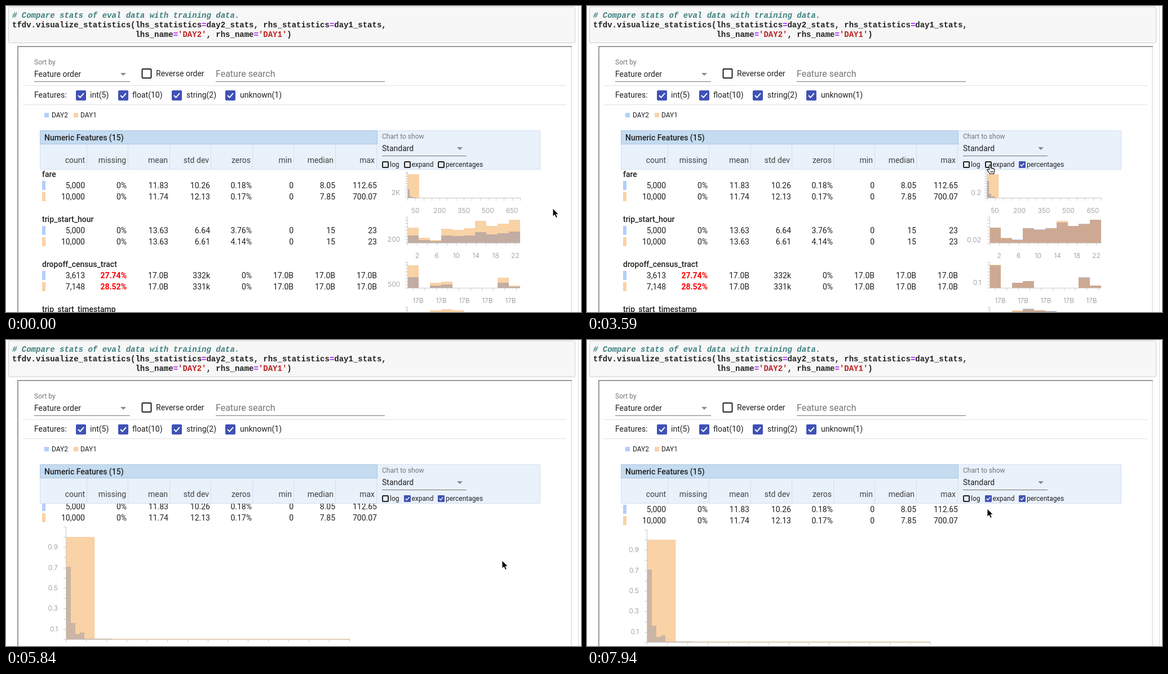
Recreate the animation shown at these times as an HTML page. Size 1020 by 544 pixels, loop 8000 ms.

```html
<!DOCTYPE html>
<html lang="en">
<head>
<meta charset="utf-8">
<title>Feature statistics</title>
<style>
html, body { margin: 0; width: 100%; height: 100%; overflow: hidden; background: #fff; }
svg { display: block; width: 1020px; height: 544px; font: 14px Roboto, sans-serif; }
text { white-space: pre; fill: #212121; }
.code { font: bold 14px "Liberation Mono", monospace; }
.axis { font: 300 12px Inter, sans-serif; fill: #8c8c8c; }
.small { font-size: 12px; }
.crisp { shape-rendering: crispEdges; }

.timed { animation: 8s step-end infinite; }
#counts { animation-name: counts; }
#shares { animation-name: shares; }
#rows { animation-name: rows; }
#big, #expandOn { animation-name: expanded; }
#percentOn { animation-name: percent; }
#ripple1 { animation-name: ripple1; }
#ripple2 { animation-name: ripple2; }
#scroll { animation-name: scroll; }
#cursor { animation-name: move; }
#hand { animation-name: hand; }
#arrow { animation-name: arrow; }

@keyframes counts { 0% { opacity: 1 } 26.125%, 100% { opacity: 0 } }
@keyframes shares { 0% { opacity: 0 } 26.125% { opacity: 1 } 58%, 100% { opacity: 0 } }
@keyframes rows { 0% { opacity: 1 } 58%, 100% { opacity: 0 } }
@keyframes expanded { 0% { opacity: 0 } 58%, 100% { opacity: 1 } }
@keyframes percent { 0% { opacity: 0 } 26.125%, 100% { opacity: 1 } }
@keyframes ripple1 { 0% { opacity: 0 } 22.375% { opacity: .2 } 26.125%, 100% { opacity: 0 } }
@keyframes ripple2 { 0% { opacity: 0 } 54.25% { opacity: .2 } 58%, 100% { opacity: 0 } }
@keyframes hand { 0% { opacity: 0 } 14.875% { opacity: 1 } 59.875%, 100% { opacity: 0 } }
@keyframes arrow { 0% { opacity: 1 } 14.875% { opacity: 0 } 59.875%, 100% { opacity: 1 } }
@keyframes scroll {
  0% { transform: none }
  71.125% { transform: translateY(-8px) }
  73% { transform: translateY(-23px) }
  74.875% { transform: translateY(-33px) }
  76.75% { transform: translateY(-41px) }
  78.625% { transform: translateY(-44px) }
  80.5% { transform: translateY(-41px) }
  82.375% { transform: translateY(-35px) }
  84.25% { transform: translateY(-24px) }
  86.125%, 100% { transform: translateY(-18px) }
}
@keyframes move {
  0% { transform: translate(970px, 360px) }
  5.625% { transform: translate(945px, 350px) }
  7.5% { transform: translate(893px, 331px) }
  9.375% { transform: translate(838px, 311px) }
  11.25% { transform: translate(800px, 298px) }
  13.125% { transform: translate(778px, 288px) }
  14.875% { transform: translate(766px, 283px) }
  37.375% { transform: translate(757px, 284px) }
  39.25% { transform: translate(742px, 285px) }
  41.125% { transform: translate(727px, 285px) }
  43% { transform: translate(715px, 284px) }
  44.875% { transform: translate(709px, 282px) }
  59.875% { transform: translate(716px, 290px) }
  61.75% { transform: translate(745px, 315px) }
  63.625% { transform: translate(800px, 355px) }
  65.5% { transform: translate(850px, 382px) }
  67.375% { transform: translate(880px, 392px) }
  97.375% { transform: translate(790px, 345px) }
  99.25%, 100% { transform: translate(710px, 300px) }
}
</style>
</head>
<body>
<svg id="stage" viewBox="0 0 1020 544"></svg>
<script>
const BLUE = '#b3cefb', ORANGE = '#f9d2a6', INDIGO = '#3f51b5', GREY = '#757575';

const rect = (x, y, w, h, fill, more = '') =>
  `<rect x="${x}" y="${y}" width="${w}" height="${h}" fill="${fill}" ${more}/>`;
const text = (x, y, s, more = '') => `<text x="${x}" y="${y}" ${more}>${s}</text>`;
const group = (body, more = '') => `<g ${more}>${body}</g>`;
const timed = (id, body) => group(body, `id="${id}" class="timed"`);
const hline = (x, y, w, c) => rect(x, y, w, 1, c);
const vline = (x, y, h, c) => rect(x, y, 1, h, c);
const label = (x, y, s, anchor = 'middle') =>
  text(x, y, s, `class="axis" text-anchor="${anchor}"`);
const range = (n, f) => Array.from({ length: n }, (_, i) => f(i)).join('');
const triangle = (x, y) => `<path d="M${x} ${y}h10l-5 5z" fill="#8a8a8a"/>`;

// Checkboxes are placed by their centre
const emptyBox = (cx, cy, size) => {
  const s = size - 2;
  return rect(cx - s / 2, cy - s / 2, s, s, 'none',
    'rx="1.2" stroke="#212121" stroke-width="2"');
};
const checkedBox = (cx, cy, size) =>
  rect(cx - size / 2, cy - size / 2, size, size, INDIGO, 'rx="2"') +
  group('<path d="M-5 0l3.5 3.6L5-3.8" fill="none" stroke="#fff" stroke-width="2"/>',
    `transform="translate(${cx} ${cy}) scale(${size / 18})"`);

function codeCell() {
  const op = '<tspan fill="#aa22ff">=</tspan>';
  const str = s => `<tspan fill="#ba2121">'${s}'</tspan>`;
  const line = (y, s, more = '') => text(11, y, s, `class="code" ${more}`);
  return rect(4.5, 1.5, 1005, 64, '#f7f7f7', 'stroke="#cfcfcf" rx="2"') +
    line(21, '# Compare stats of eval data with training data.',
      'style="font-style:italic;fill:#408080"') +
    line(38, `tfdv.visualize_statistics(lhs_statistics${op}day2_stats, rhs_statistics${op}day1_stats,`) +
    line(55, ' '.repeat(26) + `lhs_name${op}${str('DAY2')}, rhs_name${op}${str('DAY1')})`);
}

function frame() {
  return vline(1015, 0, 544, '#dcdcdc') +
    rect(20, 71, 984, 2, '#9a9a9a') + rect(20, 71, 2, 473, '#9a9a9a') +
    rect(1002, 73, 2, 471, '#e6e6e6');
}

function controls() {
  const grey = `style="fill:${GREY}"`;
  const kinds = [[133, 149, 'int(5)'], [208, 224, 'float(10)'],
    [303, 320, 'string(2)'], [398, 415, 'unknown(1)']];
  return text(50, 104, 'Sort by', `class="small" ${grey}`) +
    text(50, 126, 'Feature order') + hline(50, 134, 170, GREY) + triangle(203, 119) +
    emptyBox(249.5, 120, 18) + text(266, 125, 'Reverse order') +
    text(372, 126, 'Feature search', `style="fill:${GREY};font-size:16px"`) +
    hline(372, 134, 300, GREY) +
    hline(30, 141, 964, '#e0e0e0') + hline(30, 175, 964, '#e0e0e0') +
    text(50, 163, 'Features:') +
    kinds.map(([cx, x, s]) => checkedBox(cx, 159, 18) + text(x, 163, s)).join('') +
    rect(68, 190, 8, 8, BLUE) + text(81, 198, 'DAY2', 'class="small"') +
    rect(120, 190, 8, 8, ORANGE) + text(132, 198, 'DAY1', 'class="small"');
}

function header() {
  const names = ['count', 'missing', 'mean', 'std dev', 'zeros', 'min', 'median', 'max'];
  const edge = '#d3e0ee';
  return rect(60, 221, 888, 70, '#e9f1fb') +
    rect(60.5, 221.5, 887, 69, 'none', `stroke="${edge}"`) +
    rect(60.5, 221.5, 598, 24, '#c4dbf0', 'stroke="#aac8e2"') +
    text(68, 239, 'Numeric Features (15)', 'font-weight="500"') +
    names.map((s, i) => {
      const x = Math.round(140 + i * 73.45);
      return text(x, 279, s, 'text-anchor="end" style="fill:#424242"') +
        vline(x + 3, 246, 45, edge);
    }).join('') +
    text(667, 236, 'Chart to show', `class="small" style="fill:${GREY}"`) +
    text(667, 258, 'Standard') + hline(667, 266, 150, GREY) + triangle(800, 251) +
    [[673, 681, 'log'], [712, 719.5, 'expand'], [772, 780, 'percentages']]
      .map(([cx, x, s]) => emptyBox(cx, 282, 12) + text(x, 286, s, 'class="small"')).join('') +
    timed('percentOn', checkedBox(772, 282, 12)) +
    timed('expandOn', checkedBox(712, 282, 12)) +
    '<circle id="ripple1" class="timed" cx="772" cy="282" r="13"/>' +
    '<circle id="ripple2" class="timed" cx="712" cy="282" r="16"/>';
}

function feature(i, name, ...lines) {
  const y = 304 + i * 80;
  return text(64, y, name, 'font-weight="500"') + lines.map((line, k) =>
    rect(64, y + 7 + k * 20, 6, 16, k ? ORANGE : BLUE) +
    line.split(' ').map((v, c) => {
      const bad = c === 1 && v !== '0%' ? 'font-weight="700" style="fill:#f00"' : '';
      return text(140 + c * 74, y + 20 + k * 20, v, `text-anchor="end" ${bad}`);
    }).join('')).join('');
}

// Small axes: x0 is the left end, y0 the zero line, step the gap between y ticks
function axes(x0, y0, step, xTicks) {
  const c = '#cccccc';
  return group(vline(x0, y0 - 46, 47, c) + hline(x0, y0, 912 - x0, c) +
    range(Math.floor(46 / step) + 1, i => hline(x0 - 4, Math.round(y0 - i * step), 4, c)) +
    hline(x0 - 4, y0 - 46, 4, c) +
    xTicks.map(x => vline(Math.round(x), y0, 5, c)).join(''), 'class="crisp"');
}
const spaced = (n, from, gap) => Array.from({ length: n }, (_, i) => from + i * gap);

// Ten bins: day 1 in orange, the shared part darker, any surplus of day 2 in blue
function bars(x0, y0, day1, day2, both) {
  const w = (912 - x0) / 10;
  const bar = (i, from, to, fill) =>
    to > from ? rect(x0 + i * w, y0 - to, w, to - from, fill) : '';
  return group(day1.map((a, i) => {
    const b = day2[i], low = Math.min(a, b);
    return bar(i, 0, low, both) + bar(i, low, a, ORANGE) + bar(i, low, b, BLUE);
  }).join(''), 'class="crisp"');
}

function fareBars(x0, y0, width, height, share, both) {
  const unit = width / 700, tail = height * .006;
  const day2 = [.71, .16, .047, .067, ...Array(6).fill(.007)];
  return rect(x0, y0 - height, 70 * unit, height, ORANGE) +
    rect(x0 + 70 * unit, y0 - tail, 630 * unit, tail, ORANGE) +
    day2.map((v, i) => {
      const h = v * share * height;
      return rect(x0 + i * 11.265 * unit, y0 - h, 11.265 * unit, h, both, 'class="crisp"');
    }).join('');
}

const tens = s => s.split(' ').map(Number);

function charts({ fareX, x, share, both, yLabels, yPos, hour, tract, stamp }) {
  const k = (912 - fareX) / 700, h = (912 - x) / 23;
  const bins = [1, 3, 5, 7, 9].map(i => x + 20 + (i - 1) * (896 - x - 20) / 8);
  return fareBars(fareX + 1, 341, 911 - fareX, 42, share, '#bfaca4') +
    axes(fareX, 341, 4.3, spaced(15, fareX, 50 * k)) +
    [50, 200, 350, 500, 650].map(v => label(fareX + v * k, 368, v)).join('') +
    bars(x, 421, ...hour.map(tens), both) +
    axes(x, 421, 5.8, spaced(12, x, 2 * h)) +
    [2, 6, 10, 14, 18, 22].map(v => label(x + v * h, 448, v)).join('') +
    bars(x, 501, ...tract.map(tens), both) +
    axes(x, 501, 5.8, spaced(10, x + 10, 20.3)) +
    bins.map(v => label(v - 1, 528, '17B')).join('') +
    bars(x, 581, ...stamp.map(tens), both) + axes(x, 581, 5.8, []) +
    yLabels.map((s, i) => label(699, yPos[i], s, 'end')).join('');
}

const counts = () => charts({
  fareX: 712, x: 712, share: .5, both: '#c1ada2',
  yLabels: ['2K', '200', '500'], yPos: [336, 419, 499],
  hour: ['27 9 5 25 23 26 39 30 34 41', '13 5 3 13 12 13 19 15 17 20'],
  tract: ['40 0 9 11 0 0 0 0 18 4', '19 0 4 6 0 0 0 0 9 2'],
  stamp: ['0 0 40 42 40 37 0 0 0 0', '0 0 20 21 20 19 0 0 0 0']
});

const shares = () => charts({
  fareX: 709, x: 714, share: 1, both: '#cda993',
  yLabels: ['0.2', '0.02', '0.1'], yPos: [336, 420, 496],
  hour: ['27 9 5 26 23 26 39 30 33 41', '27 8 6 26 24 26 36 30 34 41'],
  tract: ['41 0 9 12 0 0 0 0 18 4', '40 0 9 12 0 0 0 0 19 4'],
  stamp: ['0 0 40 42 40 38 0 0 0 0', '0 0 38 43 40 39 0 0 0 0']
});

function bigChart() {
  const c = '#cccccc', x0 = 107, y0 = 555, unit = 503 / 700;
  return fareBars(x0, y0, 503, 182, 1, '#cbb5a4') +
    group(vline(106, 355, 201, c) + hline(106, y0, 504, c) +
      range(12, i => hline(102, Math.round(y0 - i * 18.2), 5, c)) +
      range(15, i => vline(Math.round(106 + i * 50 * unit), y0, 5, c)), 'class="crisp"') +
    [1, 3, 5, 7, 9].map(i => label(92, 559 - i * 18.2, `0.${i}`, 'end')).join('') +
    range(7, i => label(x0 + (50 + i * 100) * unit, 582, 50 + i * 100));
}

function pointers() {
  return timed('cursor',
    timed('arrow', '<path d="M0 0V14.2L3.3 11.2 5.6 16.4 8.2 15.3 5.9 10.2H10.2Z" stroke="#fff" stroke-width=".9"/>') +
    timed('hand', '<path d="M4.4 9.2V2a1.4 1.4 0 0 1 2.8 0V6.6a1.3 1.3 0 0 1 2.5.4 1.2 1.2 0 0 1 2.2.6 1.1 1.1 0 0 1 1.7 1V12c0 2-1 2.4-1 4.3H5.5C5 14 2.5 12.6 1 10.4c-1-1.4.6-2.6 1.8-1.4z" fill="#fff" stroke="#000" stroke-width="1.1"/>' +
      '<path d="M7.3 11v3M9.2 11v3M11 11v3" stroke="#000" stroke-width=".8"/>'));
}

const fare = feature(0, 'fare',
  '5,000 0% 11.83 10.26 0.18% 0 8.05 112.65',
  '10,000 0% 11.74 12.13 0.17% 0 7.85 700.07');
const others =
  feature(1, 'trip_start_hour',
    '5,000 0% 13.63 6.64 3.76% 0 15 23', '10,000 0% 13.63 6.61 4.14% 0 15 23') +
  feature(2, 'dropoff_census_tract',
    '3,613 27.74% 17.0B 332k 0% 17.0B 17.0B 17.0B',
    '7,148 28.52% 17.0B 331k 0% 17.0B 17.0B 17.0B') +
  feature(3, 'trip_start_timestamp');

document.getElementById('stage').innerHTML =
  '<clipPath id="body"><rect y="291" width="1002" height="253"/></clipPath>' +
  codeCell() + frame() + controls() +
  group(timed('scroll', fare + timed('rows', others) +
    timed('counts', counts()) + timed('shares', shares()) + timed('big', bigChart())),
    'clip-path="url(#body)"') +
  header() + pointers();
</script>
</body>
</html>
```
